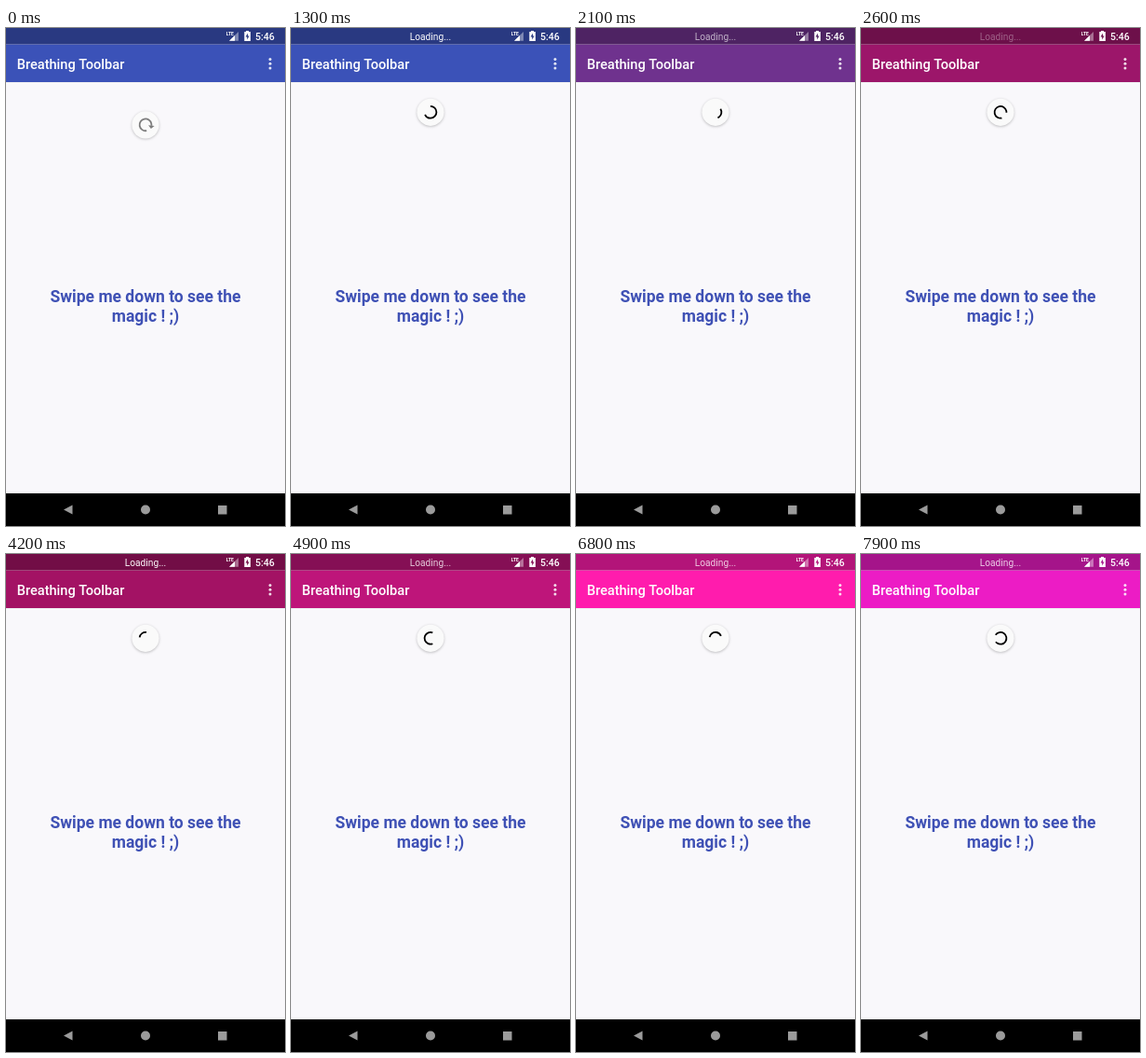
Animation, 300 px wide and 534 px high, one loop 8 s. Source, as an HTML page with a canvas:

```html
<!DOCTYPE html>
<html lang="en">
<head>
<meta charset="utf-8">
<title>Breathing Toolbar</title>
<style>
  html, body { margin: 0; width: 100%; height: 100%; overflow: hidden; background: #000; }
  canvas { display: block; }
</style>
</head>
<body>
<canvas id="stage" width="300" height="534"></canvas>
<script>
const c = document.getElementById('stage').getContext('2d');
const LOOP = 8000, STEP = 100, TURN = Math.PI * 2;
const RELEASE = 832, FINISH = 1200, SPIN = 1906, CYCLE = 1332;
const BREATH = 1350, HALF = 1500;
const COLORS = [[59, 82, 184], [163, 18, 100], [255, 28, 173], [191, 28, 255]];

const clamp = x => Math.max(0, Math.min(1, x));
const mix = (a, b, k) => a + (b - a) * k;
const smooth = x => 0.5 - 0.5 * Math.cos(Math.PI * clamp(x));
const rgb = (color, k = 1) => `rgb(${color.map(v => Math.round(v * k))})`;

// cubic-bezier(.4, 0, .2, 1)
function fastOutSlowIn(x) {
  let lo = 0, hi = 1, s = 0.5;
  for (let i = 0; i < 20; i++) {
    s = (lo + hi) / 2;
    const bx = 1.2 * s * (1 - s) ** 2 + 0.6 * s * s * (1 - s) + s ** 3;
    if (bx < x) lo = s; else hi = s;
  }
  return 3 * s * s - 2 * s ** 3;
}

function rect(x, y, w, h, fill) {
  c.fillStyle = fill;
  c.fillRect(x, y, w, h);
}

function poly(fill, ...points) {
  c.fillStyle = fill;
  c.beginPath();
  points.forEach(p => c.lineTo(...p));
  c.fill();
}

function disc(x, y, r, fill) {
  c.fillStyle = fill;
  c.beginPath();
  c.arc(x, y, r, 0, TURN);
  c.fill();
}

function text(str, x, y, font, fill, align = 'left') {
  c.font = font + ' Roboto, sans-serif';
  c.textAlign = align;
  c.fillStyle = fill;
  c.fillText(str, x, y);
}

function statusIcons(dark) {
  text('LTE', 236.7, 8.2, '700 5px', '#fff');
  poly('rgba(255,255,255,.4)', [250, 4], [250, 13.7], [240, 13.7]);
  poly('#fff', [246, 8], [246, 13.7], [240, 13.7]);
  rect(258, 3, 3, 2, '#fff');
  rect(256.3, 4, 6.6, 10, '#fff');
  poly(dark, [260, 5.5], [257.6, 9.6], [259.2, 9.6], [259.2, 12.5], [261.6, 8.4], [260, 8.4]);
  text('5:46', 268, 13, '500 10.6px', '#fff');
}

function navBar() {
  const gray = '#9b9b9b';
  rect(0, 499, 300, 35, '#000');
  poly(gray, [62, 516.5], [71.5, 511.5], [71.5, 521.5]);
  disc(150, 516.5, 5, gray);
  rect(228, 512, 9.5, 9.5, gray);
}

// Start and end of the ring, in turns
function ringTrim(t, pull) {
  if (t < SPIN) {
    const k = clamp((t - FINISH) / (SPIN - FINISH));
    const rotation = mix(0.075 + pull, 1, k);
    return [0.79 * k + rotation, 0.8 + rotation];
  }
  const turns = (t - SPIN) / CYCLE, k = turns % 1;
  const base = 0.79 + 0.6 * turns + 0.21 * k;
  return k < 0.5
    ? [base, base + 0.01 + 0.79 * fastOutSlowIn(k * 2)]
    : [base + 0.79 * fastOutSlowIn(k * 2 - 1), base + 0.8];
}

function refreshDisc(t) {
  const pull = mix(0.145, 0.5, 1 - (1 - clamp(t / 750)) ** 2);
  const back = 1 - (1 - clamp((t - RELEASE) / 200)) ** 4;
  const y = 90.3 + 93.3 * pull * (1 - back);
  const [start, end] = ringTrim(t, pull);
  const r = 6.4, arrow = 1 - back;

  c.save();
  c.shadowColor = 'rgba(0,0,0,.24)';
  c.shadowBlur = 3;
  c.shadowOffsetY = 0.8;
  disc(150, y, 14.6, '#fafafa');
  c.restore();

  c.save();
  c.translate(150, y);
  c.globalAlpha = mix(0.5, 1, clamp(t / 250));
  c.strokeStyle = '#000';
  c.lineWidth = 1.8;
  c.beginPath();
  c.arc(0, 0, r, start * TURN, end * TURN);
  c.stroke();
  if (arrow > 0) {
    c.rotate(end * TURN);
    poly('#000', [r - 3.3 * arrow, 0], [r + 3.3 * arrow, 0], [r, 3.5 * arrow]);
  }
  c.restore();
}

function draw(t) {
  const phase = Math.max(0, (t - BREATH) / (2 * HALF));
  const index = Math.floor(phase), k = smooth((phase - index) * 2);
  const color = COLORS[index].map((v, i) => mix(v, COLORS[index + 1][i], k));
  const dark = rgb(color, 0.7);

  rect(0, 0, 300, 534, '#f9f8fb');
  rect(0, 58, 300, 1, 'rgba(0,0,0,.04)');
  rect(0, 17.5, 300, 40.5, rgb(color));
  rect(0, 0, 300, 17.5, dark);
  statusIcons(dark);
  if (t >= 1300) {
    const alpha = 0.65 + 0.35 * Math.cos(Math.PI * Math.max(0, t - BREATH) / HALF);
    text('Loading...', 150, 13, '400 10.2px', `rgba(255,255,255,${alpha})`, 'center');
  }
  text('Breathing Toolbar', 11.7, 43.7, '500 14.6px', '#fff');
  [33.4, 38.2, 43].forEach(y => disc(284, y, 1.5, 'rgba(255,255,255,.85)'));

  text('Swipe me down to see the', 150, 294, '700 17.5px', '#3f51b5', 'center');
  text('magic ! ;)', 150, 314.5, '700 17.5px', '#3f51b5', 'center');
  refreshDisc(t);
  navBar();
}

function tick() {
  draw(Math.floor(performance.now() % LOOP / STEP) * STEP);
  requestAnimationFrame(tick);
}
tick();
</script>
</body>
</html>
```
